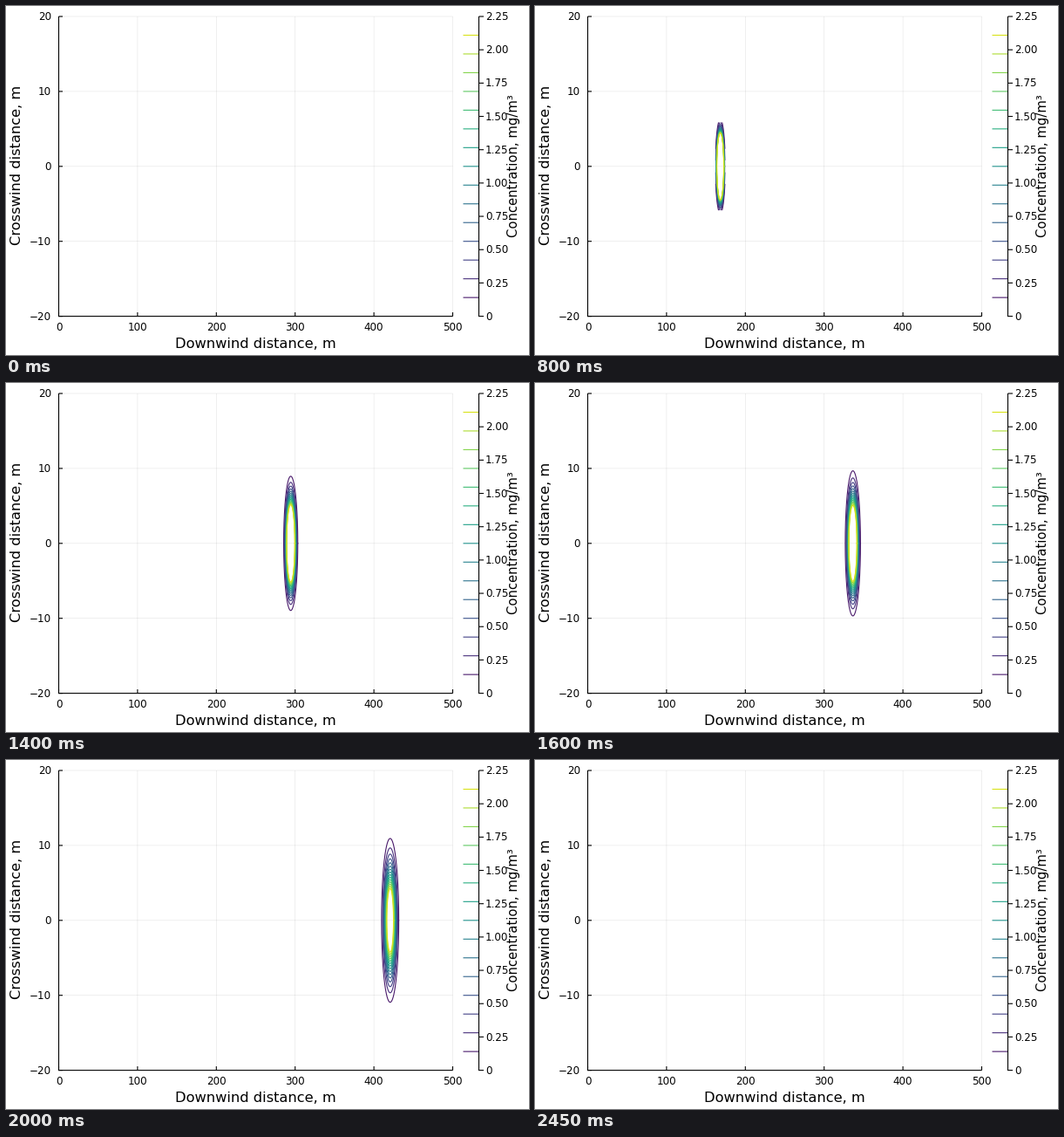
These frames come from a looping animation (600x400 px, 2500 ms). A matplotlib script:

```python
import numpy as np
import matplotlib.pyplot as plt
from matplotlib.animation import FuncAnimation

FRAMES, INTERVAL = 50, 50
LEFT, RIGHT, TOP, BOTTOM = 60.5, 512.5, 12.0, 355.6
BAR_LEFT, BAR_AXIS = 524.5, 542.5
C_MAX = 2.25
LEVELS = C_MAX * np.arange(1, 16) / 16
COLORS = plt.cm.viridis(LEVELS / C_MAX)
STEP = 10.515        # metres travelled per frame
STRENGTH = 127.2     # peak concentration times sigma_y^2 * sigma_z
PT = 0.72            # points per pixel at 100 dpi

plt.rcParams["font.family"] = "DejaVu Sans"
fig = plt.figure(figsize=(6, 4), dpi=100, facecolor="white")
ax = fig.add_axes([0, 0, 1, 1])
ax.set(xlim=(0, 600), ylim=(400, 0))
ax.axis("off")


def px(x):
    return LEFT + (RIGHT - LEFT) * x / 500


def py(y):
    return TOP + (BOTTOM - TOP) * (20 - y) / 40


def bar_y(c):
    return BOTTOM - (BOTTOM - TOP) * c / C_MAX


def line(x0, y0, x1, y1, color="black", width=1.1, **kw):
    ax.plot([x0, x1], [y0, y1], color=color, lw=width * PT,
            solid_capstyle="butt", snap=False, **kw)


def label(x, y, text, size=11.85, **kw):
    ax.text(x, y, text, fontsize=size * PT, va="baseline", **kw)


def draw_axes():
    for x in range(0, 501, 100):
        line(px(x), TOP, px(x), BOTTOM, width=0.6, alpha=0.1)
        line(px(x), BOTTOM, px(x), BOTTOM - 4.5)
        label(px(x), 371.6, str(x), ha="center")
    for y in range(-20, 21, 10):
        line(LEFT, py(y), RIGHT, py(y), width=0.6, alpha=0.1)
        line(LEFT, py(y), LEFT + 4.5, py(y))
        label(52, py(y) + 4.1, str(y).replace("-", "\u2212"), ha="right")
    line(LEFT, TOP, LEFT, BOTTOM + 0.5)
    line(LEFT, BOTTOM, RIGHT, BOTTOM)
    label(286.5, 392, "Downwind distance, m", 16.3, ha="center")
    label(17, 182.7, "Crosswind distance, m", 16.3, rotation=90,
          rotation_mode="anchor", ha="center")


def draw_colorbar():
    for level, color in zip(LEVELS, COLORS):
        line(BAR_LEFT, bar_y(level), BAR_AXIS, bar_y(level), color)
    line(BAR_AXIS, TOP, BAR_AXIS, BOTTOM + 0.5)
    for c in np.arange(0, 2.3, 0.25):
        line(BAR_AXIS, bar_y(c), BAR_AXIS + 5.5, bar_y(c))
        label(550, bar_y(c) + 4.1, f"{c:.2f}" if c else "0", ha="left")
    label(587, 183, "Concentration, mg/m\u00b3", 14.8, rotation=90,
          rotation_mode="anchor", ha="center")


draw_axes()
draw_colorbar()

window = plt.Rectangle((LEFT, TOP), RIGHT - LEFT, BOTTOM - TOP,
                       transform=ax.transData)
rings = []
for ring_color in COLORS:
    ring, = ax.plot([], [], color=ring_color, lw=1.1 * PT)
    ring.set_clip_path(window)
    rings.append(ring)

ANGLE = np.linspace(0, 2 * np.pi, 721)


def radius(peak, level, sigma):
    return sigma * np.sqrt(2 * np.log(peak / level))


def update(i):
    """Gaussian puff in stable air, drifting downwind at constant speed."""
    x = STEP * i
    if i == 0:
        for ring in rings:
            ring.set_data([], [])
        return rings
    sigma = 0.02 * x ** 0.89
    sigma_z = 0.05 * x ** 0.61
    peak = STRENGTH / (sigma ** 2 * sigma_z)
    # The young puff is too small for its outermost arcs to be resolved.
    cap = np.inf
    if x < 200:
        outer = radius(peak, LEVELS[0], sigma)
        cap = max(0.75 * outer, np.sqrt(max(outer ** 2 - 2.4 ** 2, 0)))
    for ring, level in zip(rings, LEVELS):
        if peak <= level:
            ring.set_data([], [])
            continue
        r = radius(peak, level, sigma)
        dx, dy = r * np.cos(ANGLE), r * np.sin(ANGLE)
        dy[np.maximum(np.abs(dx), np.abs(dy)) > cap] = np.nan
        ring.set_data(px(x + dx), py(dy))
    return rings


anim = FuncAnimation(fig, update, frames=FRAMES, interval=INTERVAL,
                     init_func=lambda: update(0), repeat=True,
                     repeat_delay=0, blit=False)
plt.show()
```
